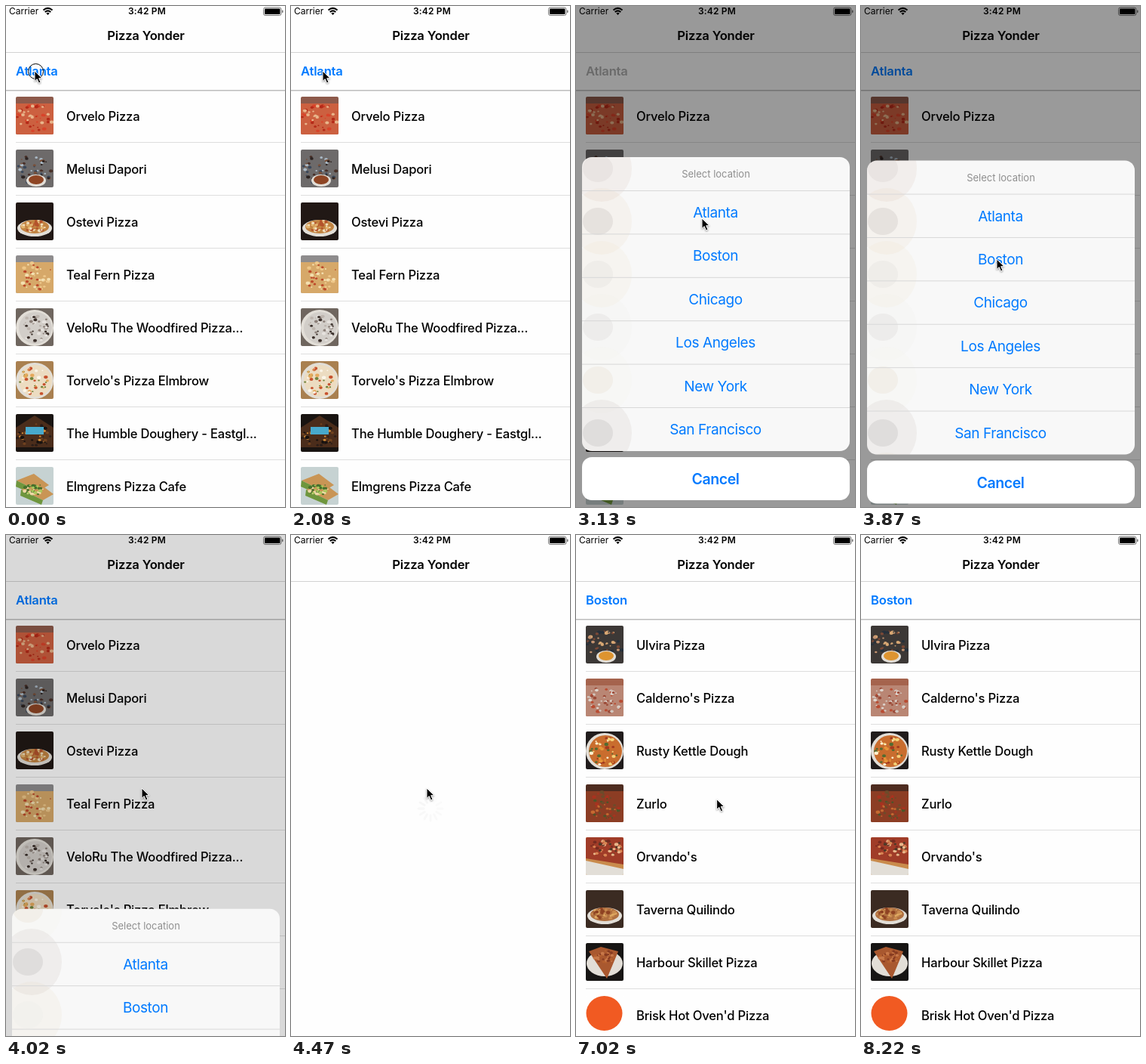
Recreate the animation shown at these times as an HTML page. Size 370x663 px, loop 8520 ms.

```html
<!DOCTYPE html>
<html lang="en">
<head>
<meta charset="utf-8">
<title>Pizza list</title>
<style>
  html, body { margin: 0; width: 100%; height: 100%; overflow: hidden; background: #fefefe; }
  svg { display: block; width: 370px; height: 663px; }
  text { font: 500 16.6px Inter, sans-serif; letter-spacing: -.2px; }
  .mid { text-anchor: middle; }
  .bold { font-weight: 600; }
  .city { fill: #007aff; }
  .city.muted { fill: #b0b0b0; }
  .status { font-size: 12px; font-weight: 400; letter-spacing: 0; }
  .clock { font-weight: 600; letter-spacing: .2px; }
  .hint { font-size: 13px; font-weight: 400; letter-spacing: 0; fill: #8f8f8f; }
  .choice { font-size: 19px; font-weight: 400; letter-spacing: -.4px; fill: #007aff; }
  .cancel { font-size: 19.5px; font-weight: 600; }
  #arrow { filter: drop-shadow(0 1px 1px #0006); }
</style>
</head>
<body>
<svg id="stage" viewBox="0 0 370 663"></svg>
<script>
const LOOP = 8520, FRAMES = 57, STEP = LOOP / FRAMES;
const ROW = 70, CHOICE = 57.4, SHEET_TRAVEL = 463;

// Shape helpers
const box = (x, y, w, h, fill, extra = '') =>
  `<rect x="${x}" y="${y}" width="${w}" height="${h}" fill="${fill}" ${extra}/>`;
const oval = (x, y, rx, ry, fill, extra = '') =>
  `<ellipse cx="${x}" cy="${y}" rx="${rx}" ry="${ry}" fill="${fill}" ${extra}/>`;
const poly = (points, fill) => `<polygon points="${points}" fill="${fill}"/>`;
const label = (x, y, cls, str) => `<text x="${x}" y="${y}" class="${cls}">${str}</text>`;

// Seeded spots spread over an ellipse
function spots(seed, colors, y, rx, ry) {
  const rand = () => (seed = (seed * 16807) % 2147483647) / 2147483647;
  return Array.from({ length: 44 }, (_, i) => {
    const angle = rand() * 2 * Math.PI, reach = Math.sqrt(rand()), r = 1 + 1.8 * rand();
    return oval((25 + rx * reach * Math.cos(angle)).toFixed(1), (y + ry * reach * Math.sin(angle)).toFixed(1),
      r.toFixed(1), (r * .8).toFixed(1), colors[i % colors.length]);
  }).join('');
}

// Each scene draws its food in one tone, then the spots on it
const PLATE = '#e2ded7';
const scenes = {
  tray: (tone, sprinkle) => box(0, 9, 50, 41, tone) + sprinkle(28, 24, 18),
  pie: (tone, sprinkle) => oval(25, 26, 25, 24, PLATE) + oval(26, 26, 22, 21, tone) + sprinkle(26, 20, 19),
  dish: (tone, sprinkle) => oval(25, 34, 23, 11, PLATE) + oval(25, 32, 19, 9, tone) + sprinkle(31, 17, 7),
  slice: (tone, sprinkle) => oval(25, 27, 24, 17, PLATE) + poly('4,11 20,5 43,11 28,47', tone) + sprinkle(18, 14, 8),
  table: (tone, sprinkle) => sprinkle(26, 24, 20) + oval(27, 41, 13, 8, PLATE) + oval(27, 40, 10, 6, tone),
  board: (tone, sprinkle) => poly('0,0 50,0 50,36 0,28', tone) + sprinkle(14, 25, 11) + poly('0,31 50,42 50,50 0,50', PLATE),
  halves: (tone, sprinkle) => [0, 12].map(y =>
    `<g transform="translate(${y / 2} ${y})">${poly('1,18 24,9 44,24 30,32', tone)}${poly('1,18 30,32 28,38 0,26', '#6f963d')}</g>`
  ).join('') + sprinkle(30, 14, 7),
  stall: (tone, sprinkle) => poly('25,2 50,18 50,44 0,44 0,18', tone) + sprinkle(28, 24, 15) + box(13, 17, 24, 10, '#48a9cc'),
  badge: tone => oval(24.5, 23, 24, 23, tone)
};

// Name, scene, backdrop, food tone, spot colours
const lists = [
  { city: 'Atlanta', places: [
    ['Orvelo Pizza', 'tray', '#8d5a4b', '#cc6040', '#b52a18 #e8b58b #d8432a'],
    ['Melusi Dapori', 'table', '#6d6a6a', '#8e4524', '#2c2321 #785039 #39475a #493028 #a9b9c6'],
    ['Ostevi Pizza', 'dish', '#211815', '#c28442', '#f1dfbd #b4532b #e2b46f'],
    ['Teal Fern Pizza', 'tray', '#8e8c8d', '#d6a869', '#f3dfb0 #bd4a2b #eec789'],
    ['VeloRu The Woodfired Pizza...', 'pie', '#6f665f', '#d2cec9', '#3b302b #bdb5ae #e6e2de #8c8079'],
    ["Torvelo's Pizza Elmbrow", 'pie', '#a98050', '#ecdcc1', '#fbf5e8 #c6512d #71843d #e5a95c'],
    ['The Humble Doughery - Eastgl...', 'stall', '#191411', '#4b2d1b', '#d38b35 #70421f #2a1d18 #18120f'],
    ['Elmgrens Pizza Cafe', 'halves', '#c6d2d2', '#c99555', '#a9c85b #46702c #eed8a5']
  ]},
  { city: 'Boston', places: [
    ['Ulvira Pizza', 'table', '#3c3836', '#dd9430', '#c49370 #26303b #7b4936 #d9a873'],
    ["Calderno's Pizza", 'tray', '#a5634d', '#b98674', '#d2c7bf #b94b31 #ddd4cd #9c4b38'],
    ['Rusty Kettle Dough', 'pie', '#211c1c', '#c96d2e', '#f4d177 #a43a1f #fff2d0 #526b31 #e69538'],
    ['Zurlo', 'tray', '#4e2c20', '#8c3d24', '#4c5528 #a9321f #6c4b2a #c66a31'],
    ["Orvando's", 'board', '#c98b4c', '#a03c28', '#d98452 #762b20 #e9b78a #4b3a28'],
    ['Taverna Quilindo', 'dish', '#3b2b22', '#b07040', '#dfaa62 #8e4222 #c98b4f'],
    ['Harbour Skillet Pizza', 'slice', '#171514', '#a9582f', '#c8794a #873b21 #b5602f'],
    ["Brisk Hot Oven'd Pizza", 'badge', '#fefefe', '#f15a22', '']
  ]}
];

const rowMarkup = ([name, scene, back, tone, colors], i) => {
  const sprinkle = (...area) => spots(7919 * (i + 1), colors.split(' '), ...area);
  return `<g transform="translate(0 ${120 + ROW * i})">
    <g class="photo" transform="translate(13 0)" clip-path="url(#thumb)">
      ${box(0, 0, 50, 50, back)}${scenes[scene](tone, sprinkle)}</g>
    ${label(80, 31.5, '', name)}${box(13, 60, 357, 1, '#dedede')}</g>`;
};
const listMarkup = ({ city, places }, id) => `<g id="list${id}">
  ${label(13, 92, 'bold city', city)}${box(0, 111, 370, 1.5, '#bdbdbd')}${places.map(rowMarkup).join('')}</g>`;

// Photos shining faintly through the sheet
const glowMarkup = lists[0].places.map(([, , back, tone], i) =>
  oval(34, 145 + ROW * i, 40, 44, tone, 'opacity=".05"') + oval(29, 145 + ROW * i, 20, 18, back, 'opacity=".07"')).join('');

const cities = ['Atlanta', 'Boston', 'Chicago', 'Los Angeles', 'New York', 'San Francisco'];
const spokes = Array.from({ length: 12 }, (_, i) =>
  `<path d="M0-9V-16" transform="rotate(${i * 30})" opacity="${.25 + i * .06}"/>`).join('');

const stage = document.getElementById('stage');
stage.innerHTML = `
<defs>
  <clipPath id="thumb"><rect width="50" height="50" rx="2"/></clipPath>
  <clipPath id="panel"><rect x="8" y="200" width="355" height="389" rx="13"/></clipPath>
</defs>
${box(0, 0, 370, 663, '#fefefe')}
${lists.map(listMarkup).join('')}
<g id="spinner" transform="translate(185 362)" stroke="#888" stroke-width="3" stroke-linecap="round">${spokes}</g>
${label(4, 11, 'status', 'Carrier')}${label(187, 11, 'status clock mid', '3:42 PM')}
<g fill="none" stroke="#000" stroke-width="2">
  <path d="M49.5 5.5Q55.5 .2 61.5 5.5M51.7 8Q55.5 4.7 59.3 8"/>
  <path d="M53.3 9.5Q55.5 7.8 57.7 9.5L55.5 12Z" fill="#000" stroke="none"/>
</g>
${box(341.5, 2, 23.5, 10.5, 'none', 'rx="2.5" stroke="#777"')}${box(343, 3.5, 20.5, 7.5, '#000', 'rx="1"')}
${box(366, 5.5, 1.5, 3.5, '#777', 'rx=".7"')}
${label(185.5, 45, 'bold mid', 'Pizza Yonder')}${box(0, 61, 370, 1, '#d2d2d2')}
${box(0, 0, 370, 663, '#000', 'id="shade"')}
<g id="sheet">
  ${box(8, 200, 355, 389, '#f8f8f8', 'rx="13"')}
  <g clip-path="url(#panel)"><g id="glow">${glowMarkup}</g></g>
  ${label(185.5, 227, 'hint mid', 'Select location')}
  ${cities.map((city, i) => box(8, 244 + CHOICE * i, 355, 1, '#d8d8d8') +
    label(185, 280 + CHOICE * i, 'choice mid', city)).join('')}
  ${box(8, 597, 355, 57, '#fff', 'rx="13"')}${label(185, 633, 'choice cancel mid', 'Cancel')}
</g>
<g id="cursor">
  <circle id="ring" cx="1.5" cy=".5" r="10" fill="none" stroke="#000"/>
  <path id="arrow" d="M0 0V13.5L3.2 10.6 5.5 16 8 15 5.7 9.7H10Z" stroke="#fff"/>
</g>`;

// Cursor moves: start, end, target point
const moves = [[900, 1500, 82, 130], [1500, 1940, 42, 86], [2680, 3130, 167, 281],
  [3290, 3730, 180, 335], [6880, 7920, 305, 613], [7920, 8220, 340, 690]];
const clicks = [0, 1940, 3740];

// The picture refreshes in even steps; a small lead absorbs timer rounding
const snap = time => Math.min(FRAMES - 1, Math.floor(time / STEP + .12)) * STEP;

function ease(t, from, to) {
  const u = Math.min(1, Math.max(0, (t - from) / (to - from)));
  return u * u * (3 - 2 * u);
}

const $ = id => document.getElementById(id);
const show = (node, on) => node.setAttribute('visibility', on ? 'visible' : 'hidden');
const firstCity = stage.querySelector('#list0 .city');
const latePhotos = stage.querySelectorAll('#list1 .photo');

function draw(time) {
  const t = snap(time);
  const open = ease(t, 2250, 2700) - ease(t, 3870, 4150);
  const drop = SHEET_TRAVEL * (1 - open);
  let x = 38, y = 86;
  for (const [from, to, toX, toY] of moves) {
    const u = ease(t, from, to);
    x += (toX - x) * u;
    y += (toY - y) * u;
  }

  show($('list0'), t < 4300);
  show($('list1'), t >= 4620);
  latePhotos.forEach((photo, i) => show(photo, t >= 4695 + 75 * i));
  firstCity.classList.toggle('muted', t > 2380 && t < 3870);

  $('spinner').setAttribute('opacity', t < 4300 ? 0 : Math.max(0, (4500 - t) / 230));
  $('shade').setAttribute('opacity', .4 * open);
  $('sheet').setAttribute('transform', `translate(0 ${drop})`);
  $('glow').setAttribute('transform', `translate(0 ${-drop})`);
  $('cursor').setAttribute('transform', `translate(${x} ${y})`);
  show($('ring'), clicks.some(click => Math.abs(t - click) < STEP / 2));
}

const start = performance.now();
function tick() {
  draw((performance.now() - start) % LOOP);
  requestAnimationFrame(tick);
}
tick();
</script>
</body>
</html>
```
